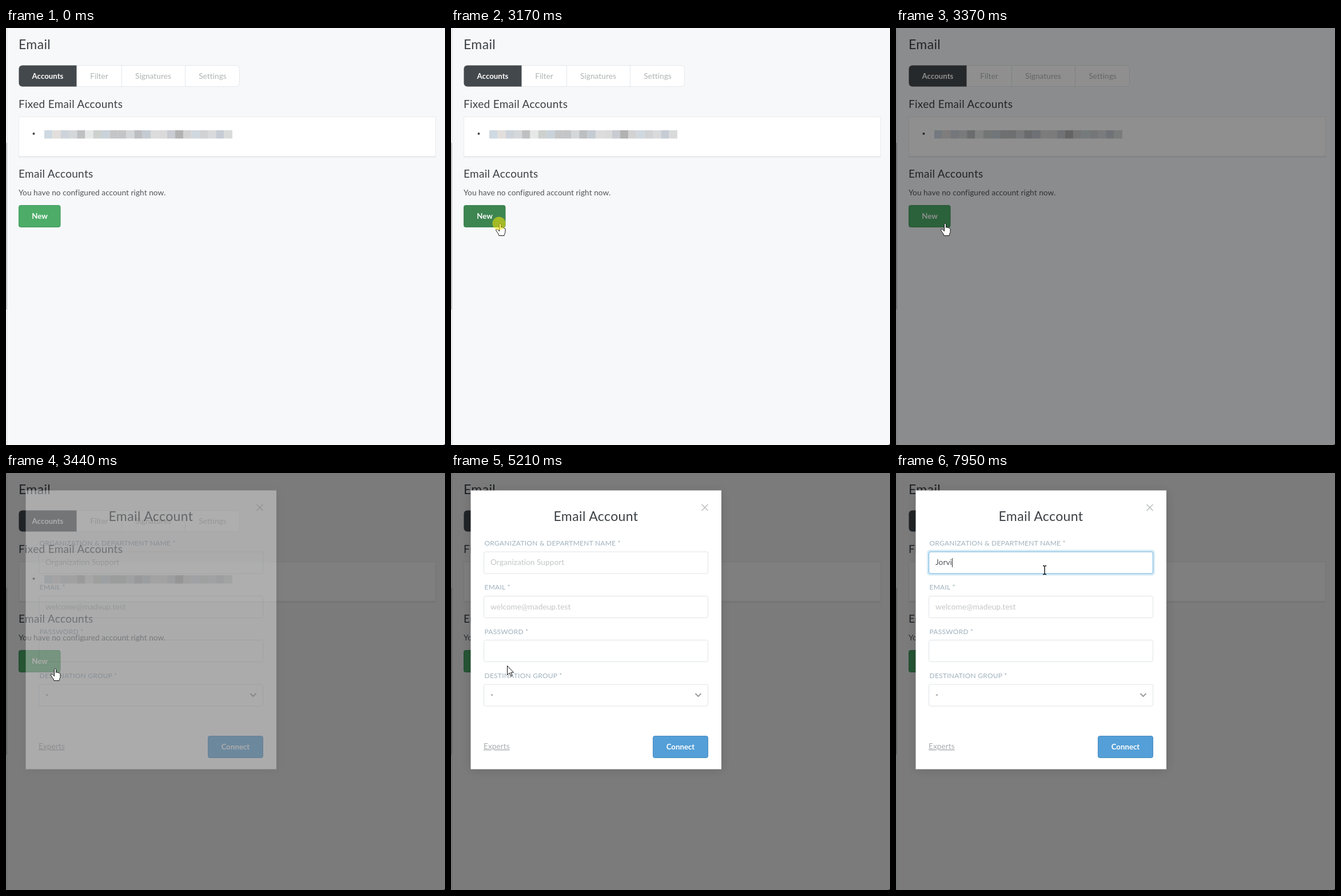
These frames come from a looping animation (768 px wide and 730 px high, 8 s). An HTML page:

```html
<!DOCTYPE html>
<html lang="en">
<head>
<meta charset="utf-8">
<title>Email account setup</title>
<style>
  html, body { margin: 0; width: 100%; height: 100%; overflow: hidden; background: #f7f8fa; }
  svg { display: block; }
  text { font: 13.7px Lato, "Open Sans", sans-serif; letter-spacing: .04px; fill: #53575a; }
  .title { font-size: 23px; letter-spacing: .38px; fill: #3b4045; }
  .heading { font-size: 19px; letter-spacing: .3px; fill: #3b4045; }
  .mid { text-anchor: middle; }
  .tab { fill: #b0b2b3; }
  .strong { font-size: 13.2px; font-weight: 700; fill: #fff; }
  .label { font-size: 12px; letter-spacing: .25px; fill: #9fb1bd; }
  .hint { fill: #c4c6c7; }
  .field { fill: #fff; stroke: #e0e3e6; }
</style>
</head>
<body>
<svg width="768" height="730" viewBox="0 0 768 730">
  <defs>
    <filter id="shadow" x="-10%" y="-10%" width="120%" height="120%">
      <feDropShadow dx="0" dy="2" stdDeviation="9" flood-opacity=".14"/>
    </filter>
  </defs>

  <rect width="768" height="730" fill="#f7f8fa"/>
  <rect width="2" height="730" fill="#f0f1f2"/>
  <rect x="2" width="1" height="730" fill="#e5e7e9"/>
  <rect y="201" width="2" height="292" fill="#c6c7c8"/>
  <path d="M768 728l-3 2h3z" fill="#666"/>

  <text class="title" x="22" y="37">Email</text>
  <rect x="22.5" y="65.5" width="386" height="37" rx="6" fill="#fff" stroke="#e4e6e8"/>
  <path d="M123.5 65.5H28.5a6 6 0 0 0-6 6v25a6 6 0 0 0 6 6h95z" fill="#43484c"/>
  <path d="M202.5 66v36M313.5 66v36" stroke="#e4e6e8"/>
  <text class="mid strong" x="73" y="89">Accounts</text>
  <text class="mid tab" x="163" y="89">Filter</text>
  <text class="mid tab" x="257.5" y="89">Signatures</text>
  <text class="mid tab" x="361.5" y="89">Settings</text>

  <text class="heading" x="22" y="140">Fixed Email Accounts</text>
  <rect x="22" y="224" width="730" height="3" fill="#eaecee"/>
  <rect x="22.5" y="155.5" width="729" height="69" fill="#fff" stroke="#e9ebed"/>
  <circle cx="48.5" cy="185" r="2" fill="#44484b"/>
  <g id="mosaic"></g>

  <text class="heading" x="22" y="262">Email Accounts</text>
  <text x="22" y="293">You have no configured account right now.</text>
  <rect id="newButton" x="22.5" y="310.5" width="72.5" height="38" rx="3"/>
  <text class="mid strong" x="59" y="334">New</text>

  <rect id="dim" width="768" height="730"/>

  <g id="modal">
    <rect x="34.5" y="30.5" width="438.5" height="488" fill="#fff" filter="url(#shadow)"/>
    <path d="M438.5 55l11 11m0-11l-11 11" stroke="#b9bcbe" stroke-width="1.5"/>
    <text class="mid title" x="253.5" y="84">Email Account</text>

    <text class="label" x="58.5" y="127">ORGANIZATION &amp; DEPARTMENT NAME *</text>
    <rect id="glow" x="54" y="134.5" width="399" height="45" rx="5" fill="#d6ebf7"/>
    <rect id="nameField" class="field" x="57.5" y="138" width="392" height="38" rx="3"/>
    <text id="name" x="69" y="161"></text>
    <rect id="caret" y="149" width="1" height="16" fill="#333"/>

    <text class="label" x="58.5" y="204">EMAIL *</text>
    <rect class="field" x="57.5" y="215.5" width="392" height="38" rx="3"/>
    <text class="hint" x="69" y="238.5">welcome@madeup.test</text>

    <text class="label" x="58.5" y="281.5">PASSWORD *</text>
    <rect class="field" x="57.5" y="292.5" width="392" height="38" rx="3"/>

    <text class="label" x="58.5" y="359">DESTINATION GROUP *</text>
    <rect class="field" x="57.5" y="370" width="392" height="38" rx="3"/>
    <text x="69" y="393">-</text>
    <path d="M427.5 386l5 5 5-5" fill="none" stroke="#9a9c9e" stroke-width="2"/>

    <text x="57" y="483" style="fill:#aaacae" text-decoration="underline">Experts</text>
    <rect x="353.5" y="460.5" width="96" height="38" rx="3" fill="#549fd7" stroke="#4588bd"/>
    <text class="mid strong" x="401.5" y="484">Connect</text>
  </g>

  <g id="pointer" fill="#fff" stroke="#111" stroke-linejoin="round">
    <path id="arrow" d="M.5.5V16.5L4.2 13 6.6 18.5 9 17.5 6.6 12.2H11.5Z"/>
    <path id="hand" d="M.5 2C.5 0 3.5 0 3.5 2V7.5C3.8 6 6.3 6 6.3 8 6.8 6.8 8.9 7 8.9 8.8 9.4 7.9 11 8.3 11 10V14.5C11 17.5 9 18.5 9 21.5H0C0 18.5-5 14-5.4 11.8-5.6 9.6-3 9.8-1.5 11.8L.5 13.8Z"/>
    <path id="beam" fill="none" stroke-width="1.4" d="M-3-7.5H-1.2L0-6.8 1.2-7.5H3M0-6.8V6.8M-3 7.5H-1.2L0 6.8 1.2 7.5H3"/>
  </g>
  <circle id="click" r="11.5" fill="rgba(255,235,0,.52)"/>
</svg>
<script>
const LOOP = 8000;
const TYPED = 'Jorvi';
const el = id => document.getElementById(id);
const set = (id, attrs) => {
  for (const key in attrs) el(id).setAttribute(key, attrs[key]);
};
const show = (id, on) => set(id, { visibility: on ? 'visible' : 'hidden' });
const between = (t, from, to) => t >= from && t < to;

// Pixelated address: one colour per block.
const blocks = ('ced9e2 e2dedb cdd3da d5d8da bfc0c1 e6e7e7 cdd1ce c9d2d9 c3c5c7 c3c5c7 d4d7d9 bcbec1 ' +
  'c4cbd2 dcdcdc dadada c8cbd1 b2b2b2 d2d2d3 d0d8df d0d2d4 d8dadc c6ccd4 d9dbdb').split(' ');
el('mosaic').innerHTML = blocks.map((color, i) =>
  `<rect x="${67 + i * 14.3}" y="179" width="14.4" height="14.5" fill="#${color}"/>`).join('');

// The pointer was sampled about every 70 ms, so its motion advances in steps.
function pointerAt(t) {
  if (t < 1330) {
    const step = Math.min(11, Math.floor((t - 500) / 69));
    const left = (1 - step / 11) ** 1.9;
    return { x: 87 + 57 * left, y: 354 + 352 * left, shape: 'arrow' };
  }
  if (t < 5210) {
    const u = Math.min(1, (Math.floor((t - 1330) / 70) + 1) / 4);
    const arrow = t < 1400 || between(t, 3300, 3370);
    return { x: 87 - 3 * u, y: 354 - 12 * u, shape: arrow ? 'arrow' : 'hand' };
  }
  const step = Math.min(8, Math.floor((t - 5210) / 67.5));
  const u = ((step + 1) / 9) ** .8;
  const ease = u * u * (3 - 2 * u);
  const x = 84 + 175.5 * ease, y = 342 - 172 * ease ** 1.4;
  const overField = [138, 215, 292].some(top => between(y, top, top + 39));
  return { x, y, shape: overField ? 'beam' : 'arrow' };
}

function render(t) {
  const pressed = between(t, 3170, 3300);
  set('newButton', pressed ? { fill: '#3d8551', stroke: '#3d8551' } : { fill: '#4dac68', stroke: '#3f9559' });
  set('dim', { opacity: t < 3300 ? 0 : t < 3370 ? .215 : t < 3440 ? .44 : .5 });
  set('modal', { opacity: t < 3440 ? 0 : t < 3510 ? .37 : t < 3580 ? .83 : 1 });

  const focused = t >= 6080;
  show('glow', focused);
  set('nameField', { style: focused ? 'stroke:#6fb0da' : '' });
  const count = t < 7550 ? 0 : Math.min(TYPED.length, Math.floor((t - 7550) / 100) + 1);
  const name = el('name');
  name.textContent = count ? TYPED.slice(0, count) : 'Organization Support';
  set('name', { class: count ? '' : 'hint' });
  set('caret', { x: count ? Math.round(69 + name.getComputedTextLength()) : 70 });
  show('caret', focused && !between(t, 6670, 7140));

  const pointer = pointerAt(t);
  for (const shape of ['arrow', 'hand', 'beam']) show(shape, t >= 500 && shape === pointer.shape);
  set('pointer', { transform: `translate(${Math.round(pointer.x)} ${Math.round(pointer.y)})` });

  show('click', pressed || between(t, 6080, 6230));
  set('click', pressed ? { cx: 84, cy: 342 } : { cx: 257.5, cy: 168.5 });
}

const start = performance.now();
function tick() {
  render((performance.now() - start) % LOOP);
  requestAnimationFrame(tick);
}
tick();
</script>
</body>
</html>
```
